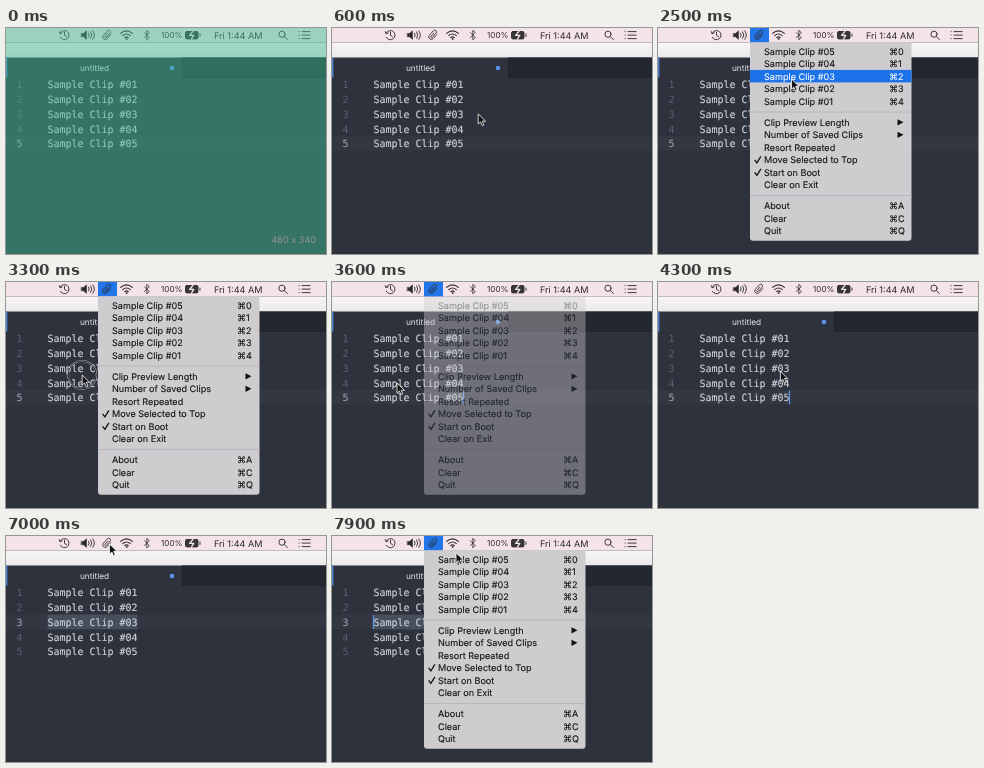
Recreate the animation shown at these times as an HTML page. Size 320 px wide and 226 px high, loop 8 s.

```html
<!DOCTYPE html>
<html lang="en">
<head>
<meta charset="utf-8">
<title>Clipboard menu</title>
<style>
  html, body { margin: 0; width: 100%; height: 100%; overflow: hidden; background: #2e323d; }
  svg { display: block; width: 100vw; height: 100vh; }
  text { font-family: Inter, Roboto, sans-serif; font-size: 9.1px; text-rendering: geometricPrecision; white-space: pre; }
  .code text { font-family: "DejaVu Sans Mono", "Noto Sans Mono", monospace; font-size: 9.97px; }
  .menu text { fill: #111113; stroke: #111113; stroke-width: .1; }
  .line { fill: none; stroke: #2b282b; stroke-width: .9; stroke-linecap: round; stroke-linejoin: round; }
</style>
</head>
<body>
<svg viewBox="0 0 320 226" preserveAspectRatio="none">
  <defs>
    <linearGradient id="title" x2="0" y2="1">
      <stop stop-color="#f8f5f6"/><stop offset="1" stop-color="#ebe9ea"/>
    </linearGradient>
  </defs>

  <rect width="320" height="226" fill="#2e323d"/>
  <rect y="14.5" width="320" height="15" fill="url(#title)"/>
  <rect x="176.5" y="29.5" width="143.5" height="20" fill="#23272f"/>
  <path d="M176.5 29.5v20H320" fill="none" stroke="#1c1f26" stroke-width=".7"/>
  <rect y="29.5" width="1.4" height="20" fill="#4d83d8"/>
  <text x="88.5" y="43" text-anchor="middle" fill="#e4e7ec" style="font-size:8.3px">untitled</text>
  <circle cx="166" cy="40" r="2.3" fill="#5a93e6"/>

  <g class="code">
    <rect id="active" width="320" height="14.7" fill="#323742"/>
    <rect id="sel" height="14.7" fill="#474f5c"/>
    <g id="lines"></g>
    <rect id="caret" width="1.3" height="14" fill="#5b92e8"/>
  </g>

  <rect width="320" height="14.2" fill="#f4e4e9"/>
  <rect y="14" width="320" height=".6" fill="#d3c8cc"/>
  <rect id="hot" x="92" width="19" height="14.5" fill="#2375ea"/>

  <g class="line">
    <path d="M54.2 5.2A4.6 4.6 0 1 1 54.3 9.3M53.3 3.6l.8 2.2 2.1-.9M58.5 4.2V7.4l2 1.2"/>
    <path d="M75.5 5.4h2l3-2.6v8.6l-3-2.6h-2z" fill="#2b282b" stroke-width=".5"/>
    <path d="M82.6 5.2q1.2 1.9 0 3.8M84.7 3.9q2.2 3.2 0 6.4M86.8 2.8q3.2 4.3 0 8.6"/>
    <path transform="translate(101 7) rotate(42)" d="M2.5-2.6V2.6a2.5 2.5 0 0 1-5 0V-3.4a1.8 1.8 0 0 1 3.6 0V2.2a.8.8 0 0 1-1.7 0V-2" stroke-width=".8"/>
    <path d="M114.6 5.4q5.9-5 11.8 0M116.7 7.6q3.8-3.2 7.6 0M118.7 9.6q1.8-1.5 3.6 0" stroke-width="1.1"/>
    <circle cx="120.5" cy="11" r=".5"/>
    <path d="M138.3 4.6l5 5-2.5 2.2V2.4l2.5 2.2-5 5" stroke-width=".8"/>
    <rect x="179.5" y="3.5" width="12.5" height="7.4" rx="1.3" fill="#3a373a"/>
    <path d="M194 6v2.4"/>
    <path d="M186.9 3.4l-3.2 4h4l-2.2 3.6" stroke="#f4e4e9" stroke-width="1.4"/>
    <circle cx="276" cy="6.2" r="3.1"/>
    <path d="M278.4 8.6l3 3"/>
    <path d="M293 3.6h.2M293 7.1h.2M293 10.6h.2M296 3.6h8.2M296 7.1h8.2M296 10.6h8.2"/>
  </g>
  <g fill="#2b282b">
    <text x="155" y="10.3" style="font-size:8.1px">100%</text>
    <text x="208" y="10.5">Fri 1:44 AM</text>
  </g>

  <g class="menu" id="menu">
    <path d="M92 14.2H253.5V209.8a3 3 0 0 1-3 3H95a3 3 0 0 1-3-3z" fill="#cfccd0"/>
    <rect id="row" x="92" width="161.5" height="12.5" fill="#1c72e8"/>
    <path d="M92 84H253.5M92 167.6H253.5" stroke="#b9b6ba"/>
    <g id="items"></g>
  </g>

  <g id="pointer">
    <g id="ring" fill="none">
      <circle r="14" stroke="#fff" stroke-opacity=".5" stroke-width="2"/>
      <circle r="14" stroke="#222" stroke-width="1"/>
    </g>
    <path d="M0 0V10.2L2.4 8 4 11.7 5.8 10.9 4.2 7.3H7.4z" fill="#111" stroke="#fff" stroke-width=".8" stroke-linejoin="round"/>
  </g>

  <g id="cover">
    <rect width="320" height="226" fill="#3fbe94"/>
    <text x="310" y="215" text-anchor="end" fill="#fff">480 x 340</text>
  </g>
</svg>
<script>
const LOOP = 8000, STEP = 100, ROW = 12.5, ROW_TOP = 16.9, LEFT = 41.5, CHAR = 6, PITCH = 14.7;
const $ = id => document.getElementById(id);
const set = (el, attrs) => { for (const k in attrs) el.setAttribute(k, attrs[k]); };
const show = (el, on) => set(el, { visibility: on ? "visible" : "hidden" });
const within = (t, a, b) => t >= a && t < b;

function add(parent, tag, attrs, text = "") {
  const el = document.createElementNS("http://www.w3.org/2000/svg", tag);
  set(el, attrs);
  el.textContent = text;
  return parent.appendChild(el);
}

const lineTop = n => 49.2 + (n - 1) * PITCH;

const numbers = [1, 2, 3, 4, 5].map(n => {
  const y = lineTop(n) + 11.2;
  add($("lines"), "text", { x: LEFT, y, fill: "#d0d5dd", stroke: "#d0d5dd", "stroke-width": 0.12 }, "Sample Clip #0" + n);
  return add($("lines"), "text", { x: 10.5, y }, n);
});

const clips = [5, 4, 3, 2, 1].map((n, i) => {
  const y = 26.6 + i * ROW;
  return [
    add($("items"), "text", { x: 106, y }, "Sample Clip #0" + n),
    add($("items"), "text", { x: 231, y }, "⌘" + i)
  ];
});

const options = ["Clip Preview Length", "Number of Saved Clips", "Resort Repeated",
  "Move Selected to Top", "Start on Boot", "Clear on Exit"];
options.forEach((label, i) => {
  const y = 97.6 + i * ROW;
  add($("items"), "text", { x: 106, y }, label);
  if (i < 2) add($("items"), "path", { d: `M239.5 ${y - 6.4}l6 3.1-6 3.1z`, fill: "#111113" });
  if (i === 3 || i === 4)
    add($("items"), "path", { d: `M96.6 ${y - 3.2}l2.3 3 4-6.6`, fill: "none", stroke: "#111113", "stroke-width": 1.3 });
});
["About", "Clear", "Quit"].forEach((label, i) => {
  const y = 181.3 + i * ROW;
  add($("items"), "text", { x: 106, y }, label);
  add($("items"), "text", { x: 231, y }, "⌘" + "ACQ"[i]);
});

// Pointer way points: time, x, y
const path = [
  [500, 150, 92], [1100, 98, 9], [1400, 98, 9], [1800, 120, 22], [2200, 131, 39],
  [2500, 133.5, 51], [2800, 133, 53], [3100, 108, 70], [3400, 65, 101], [4000, 65, 101],
  [4400, 133, 87], [4500, 133, 87], [5000, 22, 90.5], [6100, 22, 90.5],
  [6900, 103.5, 8], [7400, 103.5, 8], [7900, 124, 16.8]
];

function pointerAt(t) {
  const i = path.findIndex(p => p[0] > t);
  if (i < 0) return path[path.length - 1].slice(1);
  if (i === 0) return path[0].slice(1);
  const [a, b] = [path[i - 1], path[i]];
  const u = (t - a[0]) / (b[0] - a[0]), e = u * u * (3 - 2 * u);
  return [a[1] + (b[1] - a[1]) * e, a[2] + (b[2] - a[2]) * e];
}

// Characters left of the caret while line 3 is dragged over backwards
function caretColumn(t) {
  if (t < 4500) return 15;
  const x = pointerAt(Math.min(t, 5000))[0];
  return Math.max(0, Math.min(15, Math.round((x - LEFT) / CHAR)));
}

function menuAlpha(t) {
  if (within(t, 1200, 3500) || t >= 7200) return 1;
  return within(t, 3500, 3800) ? [0.7, 0.4, 0.15][Math.floor((t - 3500) / 100)] : 0;
}

function caretOn(t) {
  if (t < 3400) return false;
  if (t < 5150 || t >= 7250) return true;
  return Math.floor((t - 5150) / 350) % 2 === 0;
}

function draw(t) {
  const [x, y] = pointerAt(t);
  show($("pointer"), t >= 500);
  set($("pointer"), { transform: `translate(${x} ${y})` });
  show($("ring"), [[1200, 1500], [3300, 3500], [4500, 5300], [7100, 7300]].some(([a, b]) => within(t, a, b)));

  const alpha = menuAlpha(t);
  set($("menu"), { opacity: alpha });
  show($("hot"), alpha > 0);
  const r = Math.floor((y - ROW_TOP) / ROW);
  const hover = alpha === 1 && x >= 92 && x < 254 && r >= 0 && r < 5 ? r : -1;
  show($("row"), hover >= 0);
  set($("row"), { y: ROW_TOP + hover * ROW });
  clips.forEach((pair, i) => pair.forEach(el => { el.style.fill = el.style.stroke = i === hover ? "#fff" : ""; }));

  const line = t < 4500 ? 5 : 3, top = lineTop(line), end = LEFT + 15 * CHAR;
  const caretX = LEFT + caretColumn(t) * CHAR;
  set($("active"), { y: top });
  set($("sel"), { x: caretX, y: top, width: end - caretX });
  set($("caret"), { x: caretX - 0.7, y: top + 0.4 });
  show($("caret"), caretOn(t));
  numbers.forEach((el, i) => set(el, { fill: i + 1 === line ? "#a4abb7" : "#596170" }));

  set($("cover"), { opacity: t < 100 ? 0.47 : t < 200 ? 0.2 : 0 });
}

function tick() {
  draw(Math.floor(performance.now() % LOOP / STEP) * STEP);
  requestAnimationFrame(tick);
}
tick();
</script>
</body>
</html>
```
